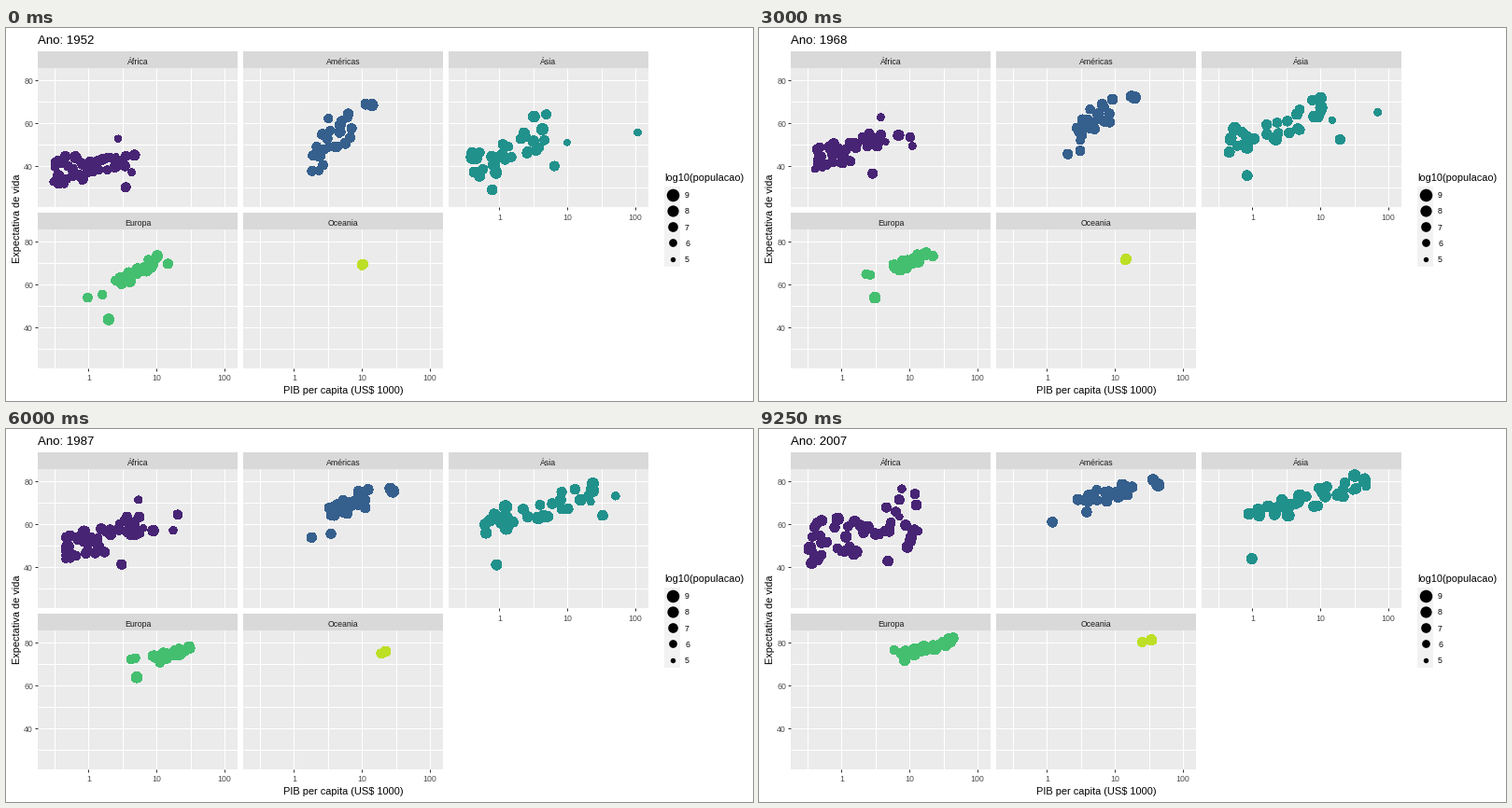
These frames come from a looping animation (800 px wide and 400 px high, 10 s). A matplotlib script:

```python
import numpy as np
import matplotlib.pyplot as plt
from matplotlib.animation import FuncAnimation
from matplotlib.patches import Rectangle

W, H, DPI = 800, 400, 100
PX = 72 / DPI                      # points per pixel
STEPS, HOLD, FRAMES, INTERVAL = 36, 2, 40, 250
PANEL_W, PANEL_H, STRIP_H = 214, 149, 18.5
U = np.linspace(0, 1, STEPS)
# Weights of the start, middle and end pose for a smooth path through all three.
BLEND = np.array([(1 - U) * (1 - 2 * U), 4 * U * (1 - U), U * (2 * U - 1)])
rng = np.random.default_rng(11)


def to_x(log_gdp, left):
    return left - .25 + (log_gdp + .7513) * 72.8


def to_y(life, top):
    return top + .2 + (85.55 - life) * 2.296


def area(log_pop):
    """Marker area in square points."""
    share = np.clip((log_pop - 4.778) / (9.12 - 4.778), 0, 1)
    diameter = 2.134 * (1 + 5 * np.sqrt(share)) + .9
    return (diameter * PX) ** 2


def cloud(n, trends, skew=1):
    """Three poses of n dots scattered along a rising trend line.

    A trend is (low log GDP, high log GDP, life at low, life at high, spread).
    """
    rank = (np.arange(n) + .5) / n
    lift = rng.permutation(np.linspace(-1.6, 1.6, n))
    poses = []
    for lo, hi, life_lo, life_hi, spread in trends:
        q = np.clip(rank + rng.normal(0, .05, n), 0, 1) ** skew
        z = .85 * lift + rng.normal(0, .35, n)
        poses.append(np.column_stack([lo + (hi - lo) * q,
                                      life_lo + (life_hi - life_lo) * q + spread * z]))
    return np.stack(poses, axis=1)


def loner(*pose):
    """Three poses of one dot from (GDP in US$ 1000, life) pairs."""
    p = np.array(pose, float)
    p[:, 0] = np.log10(p[:, 0])
    return p


fig = plt.figure(figsize=(W / DPI, H / DPI), dpi=DPI, facecolor="white")
ax = fig.add_axes([0, 0, 1, 1])
ax.set(xlim=(0, W), ylim=(H, 0))
ax.axis("off")


def text(x, y, s, size, color="black", **kw):
    return ax.text(x, y, s, fontsize=size * PX, color=color,
                   family="Liberation Sans", **kw)


def rect(x, y, w, h, color):
    ax.add_patch(Rectangle((x, y), w, h, fc=color, lw=0, zorder=0))


def line(xs, ys, color="white"):
    ax.plot(xs, ys, color=color, lw=PX, zorder=1, solid_capstyle="butt")


def dots(x, y, s, color):
    return ax.scatter(x, y, s=s, color=color, linewidths=0,
                      antialiased=False, zorder=3)


def draw_panel(name, left, top, x_axis, y_axis):
    right, bottom = left + PANEL_W, top + PANEL_H
    rect(left, top - STRIP_H, PANEL_W, STRIP_H, "#D9D9D9")
    rect(left, top, PANEL_W, PANEL_H, "#EBEBEB")
    text(left + PANEL_W / 2, top - 4, name, 8.8, "#1A1A1A", ha="center")
    for v in (-.5, 0, .5, 1, 1.5, 2):
        x = to_x(v, left)
        line([x, x], [top, bottom])
        if x_axis and v in (0, 1, 2):
            line([x, x], [bottom, bottom + 3], "#333333")
            text(x, bottom + 13.5, str(10**v), 8.8, "#4D4D4D", ha="center")
    for v in range(30, 90, 10):
        y = to_y(v, top)
        line([left, right], [y, y])
        if y_axis and v % 20 == 0:
            line([left - 3, left], [y, y], "#333333")
            text(left - 5, y + 4, str(v), 8.8, "#4D4D4D", ha="right")


class Continent:
    def __init__(self, name, col, row, tone, growth, crowd=None, crowd_pop=7, loners=()):
        left, top = 34 + 220 * col, 43 + 173 * row
        draw_panel(name, left, top, row == 1 or col == 2, col == 0)
        poses = np.array([p for _, p in loners])
        pop = np.array([v for v, _ in loners])
        if crowd is not None:
            poses = np.concatenate([poses, crowd])
            pop = np.append(pop, rng.normal(crowd_pop, .5, len(crowd)))
        path = np.einsum("dpc,ps->dsc", poses, BLEND)
        self.x = to_x(path[..., 0], left)
        self.y = to_y(path[..., 1], top)
        self.size = area(pop[:, None] + growth * (U - .5))
        self.marks = dots([], [], [], plt.cm.viridis(tone))

    def show(self, k):
        self.marks.set_offsets(np.column_stack([self.x[:, k], self.y[:, k]]))
        self.marks.set_sizes(self.size[:, k])


continents = [
    Continent("África", 0, 0, .1, .46,
              cloud(46, [(-.52, .55, 36, 42, 3.6),
                         (-.35, .75, 47, 58, 4),
                         (-.5, 1.1, 50, 61, 7)], skew=1.25), 6.6,
              [(7.4, loner((4.73, 45), (8.3, 57), (9.27, 49.3))),
               (6.8, loner((3.52, 30), (2.87, 39.7), (4.8, 42.7))),
               (6.4, loner((2.4, 42.7), (18, 60.5), (12, 74))),
               (5.8, loner((4.3, 37), (16, 55), (13.2, 56.7))),
               (5.7, loner((2.72, 52.7), (4.75, 68.5), (7.67, 76.4)))]),
    Continent("Américas", 1, 0, .3, .44,
              cloud(21, [(.28, .88, 45, 61, 5.8),
                         (.45, 1.05, 61.5, 71, 3.2),
                         (.45, 1.25, 70.5, 77, 1.8)]), 6.9,
              [(8.3, loner((14, 68.4), (24.6, 74.1), (43, 78.2))),
               (7.3, loner((11.4, 68.8), (22.6, 75.1), (36.3, 80.7))),
               (6.8, loner((1.84, 37.6), (1.95, 50.8), (1.2, 60.9))),
               (6.7, loner((2.68, 40.4), (3.35, 52.2), (3.82, 65.6)))]),
    Continent("Ásia", 2, 0, .5, .44,
              cloud(27, [(-.48, .72, 37, 57, 5),
                         (-.35, 1.25, 53, 73, 3.5),
                         (-.05, 1.65, 63, 80, 2.6)]), 7.1,
              [(8.9, loner((.4, 44), (.86, 64.7), (4.96, 73))),
               (8, loner((3.22, 63), (18.3, 76.5), (31.7, 82.6))),
               (7.1, loner((.78, 28.8), (.88, 39.2), (.98, 43.8))),
               (6.9, loner((6.46, 39.9), (30, 60), (21.7, 72.8))),
               (5.8, loner((108, 55.6), (56, 70.5), (47.3, 77.6))),
               (5.5, loner((9.87, 50.9), (19.3, 67.4), (29.8, 75.6)))]),
    Continent("Europa", 0, 1, .7, .12,
              cloud(26, [(.4, 1.02, 60, 72, 1.6),
                         (.88, 1.4, 70.5, 75.5, 1.2),
                         (.82, 1.65, 73.5, 80.8, 1)]), 6.9,
              [(7.6, loner((1.97, 43.6), (4.25, 60.3), (8.46, 71.8))),
               (6.5, loner((.97, 53.8), (3.8, 70.3), (7.45, 74.9))),
               (6.3, loner((1.6, 55.2), (3.6, 69.7), (5.94, 76.4))),
               (6.8, loner((14.7, 69.6), (27.7, 75.8), (37.5, 81.7)))]),
    Continent("Oceania", 1, 1, .9, .35, loners=[
        (7.15, loner((10.04, 69.1), (19, 74.2), (34.4, 81.2))),
        (6.5, loner((10.56, 69.4), (17.2, 73.3), (25.2, 80.2)))]),
]

text(361, 392.5, "PIB per capita (US$ 1000)", 11, ha="center")
text(12, 204, "Expectativa de vida", 11, rotation=90, ha="center", va="center")
text(705, 163.5, "log10(populacao)", 11)
rect(705, 170, 17.3, 86.4, "#F2F2F2")
for i, v in enumerate((9, 8, 7, 6, 5)):
    y = 178.6 + 17.28 * i
    dots([713.6], [y], [area(v)], "black")
    text(727, y + 3.5, str(v), 8.8)
title = text(34, 17, "", 13.2)


def update(n):
    k = min(max(n - HOLD, 0), STEPS - 1)
    title.set_text(f"Ano: {round(1952 + 55 * U[k])}")
    for c in continents:
        c.show(k)
    return [title, *(c.marks for c in continents)]


anim = FuncAnimation(fig, update, frames=FRAMES, interval=INTERVAL,
                     init_func=lambda: update(0), repeat=True, blit=False)
plt.show()
```
